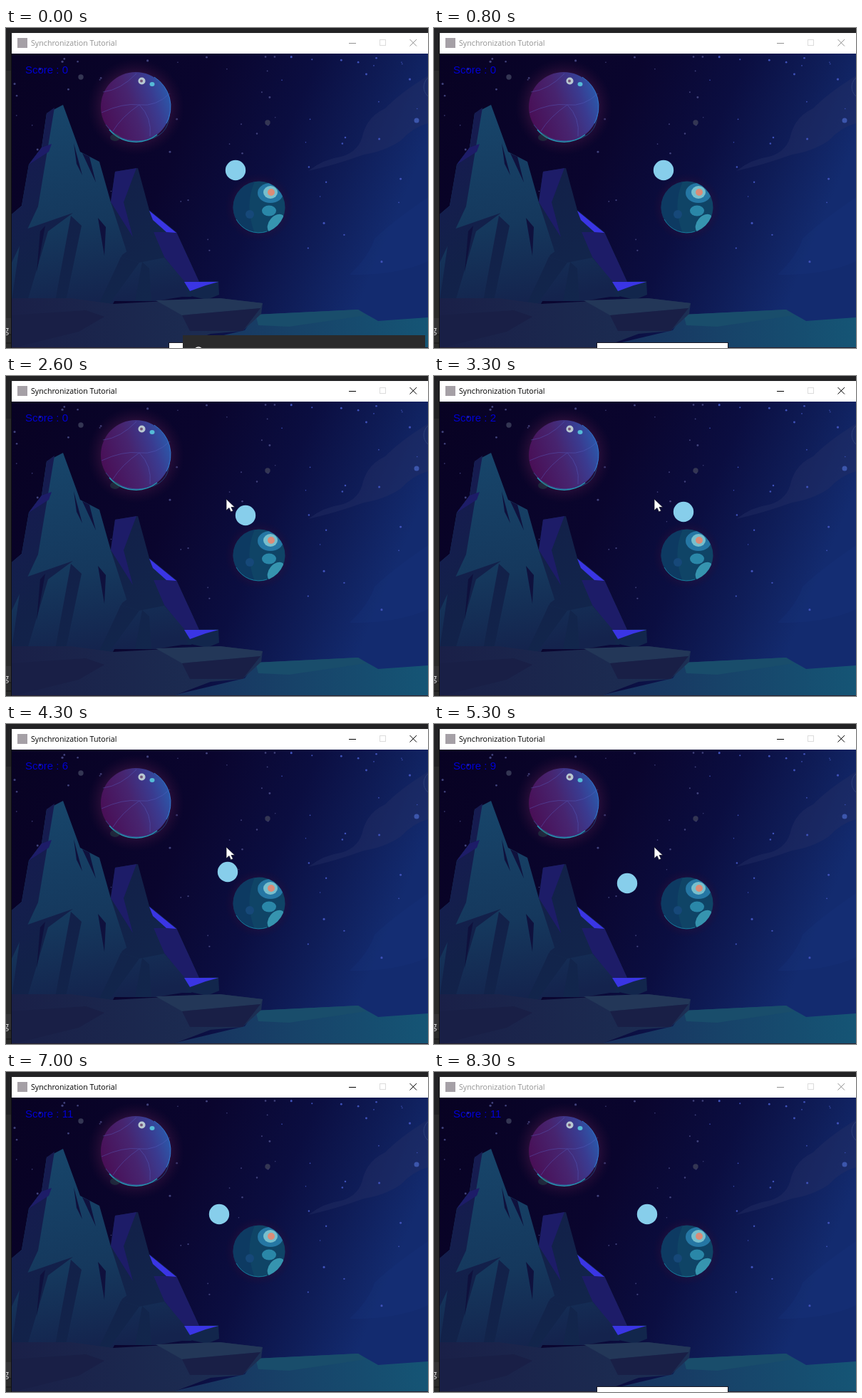
An HTML page for the animation above (8400 ms loop, 592x450 px).

```html
<!DOCTYPE html>
<html lang="en">
<head>
<meta charset="utf-8">
<title>Synchronization Tutorial</title>
<style>
  html, body { margin: 0; width: 592px; height: 450px; overflow: hidden; background: #222; }
  svg { display: block; }
  .title { font: 10.7px "Open Sans", "Noto Sans", sans-serif; }
  .score { font: 15px "Liberation Sans", Arial, sans-serif; fill: #0000d2; }
  .lit { fill: url(#lit); }
  .mid { fill: url(#mid); }
  .dark { fill: #0f113d; }
  .violet { fill: #1d1c68; }
  .bright { fill: #3a35e4; }
</style>
</head>
<body>
<svg width="592" height="450" viewBox="0 0 592 450">
  <defs>
    <linearGradient id="sky" x1="0" x2="1" y1="0" y2=".3">
      <stop offset="0" stop-color="#080223"/>
      <stop offset=".45" stop-color="#0a052e"/>
      <stop offset=".68" stop-color="#0b0e41"/>
      <stop offset=".85" stop-color="#0f1d58"/>
      <stop offset="1" stop-color="#132b6f"/>
    </linearGradient>
    <linearGradient id="lit" gradientUnits="userSpaceOnUse" x1="70" y1="110" x2="120" y2="390">
      <stop offset="0" stop-color="#17456a"/>
      <stop offset=".6" stop-color="#15385d"/>
      <stop offset="1" stop-color="#14234d"/>
    </linearGradient>
    <linearGradient id="mid" gradientUnits="userSpaceOnUse" x1="20" y1="160" x2="200" y2="380">
      <stop offset="0" stop-color="#161b50"/>
      <stop offset=".5" stop-color="#122149"/>
      <stop offset="1" stop-color="#12264c"/>
    </linearGradient>
    <linearGradient id="slab" x1="0" x2="1">
      <stop offset="0" stop-color="#1a2048"/>
      <stop offset="1" stop-color="#1c2f54"/>
    </linearGradient>
    <linearGradient id="shore" x1="0" x2="1">
      <stop offset="0" stop-color="#182f5c"/>
      <stop offset=".5" stop-color="#174369"/>
      <stop offset="1" stop-color="#155575"/>
    </linearGradient>
    <linearGradient id="violet" x1="0" x2="1" y1=".65" y2=".3">
      <stop offset="0" stop-color="#490e55"/>
      <stop offset=".45" stop-color="#47246f"/>
      <stop offset=".75" stop-color="#3a3b90"/>
      <stop offset="1" stop-color="#2a5bad"/>
    </linearGradient>
    <radialGradient id="halo">
      <stop offset=".68" stop-color="#35123f" stop-opacity=".75"/>
      <stop offset="1" stop-color="#200a30" stop-opacity="0"/>
    </radialGradient>
    <clipPath id="tealClip"><circle cx="355" cy="252" r="36.5"/></clipPath>
    <clipPath id="view"><path d="M8 36H592V449H8Z"/></clipPath>
  </defs>

  <rect width="592" height="450" fill="#222224"/>
  <path d="M0 60H7V450H0Z" fill="#2b2b2b"/>
  <path d="M0 408H8V431H0Z" fill="#343436"/>
  <path d="M0 431H8M0 443H8" stroke="#151515"/>
  <text x="-3" y="429" font-size="13" font-family="Open Sans, sans-serif" fill="#ddd">g</text>
  <path d="M7.500 450V7" stroke="#101012"/>
  <path d="M8 7H592V36H8Z" fill="#fff"/>

  <g clip-path="url(#view)">
    <rect x="8" y="36" width="584" height="414" fill="url(#sky)"/>
    <path d="M424 201Q446 184 470 181Q496 174 501 148Q508 124 532 113Q552 92 592 67V134Q570 140 553 159Q530 174 502 178Q464 192 424 201Z" fill="#263165" opacity=".4"/>
    <path d="M482 347Q510 320 517 296Q545 270 592 238V328Q550 348 482 347Z" fill="#1d3b82" opacity=".2"/>
    <circle cx="603" cy="83" r="17" fill="#1a2c68" stroke="#34477f" opacity=".7"/>
    <g id="stars"></g>

    <circle cx="182" cy="111" r="68" fill="url(#halo)"/>
    <circle cx="182" cy="111" r="49" fill="url(#violet)"/>
    <g fill="none" stroke="#5964c8" opacity=".4">
      <path d="M136 90Q161 87 183 64M134 119Q164 105 187 108T230 92M150 145Q162 125 187 108Q205 126 202 152"/>
      <path d="M140 136Q160 163 194 158T229 122" stroke="#258fd0"/>
    </g>
    <path d="M145 143A49 49 0 0 0 212 150" fill="none" stroke="#2496b0" stroke-width="1.500"/>
    <path d="M208 69A49 49 0 0 1 225 134" fill="none" stroke="#3278cf"/>
    <circle cx="190.500" cy="74.500" r="5" fill="#b9c9d2"/>
    <circle cx="190" cy="74.500" r="2" fill="#765779"/>
    <ellipse cx="205" cy="79" rx="3.500" ry="3" fill="#55bbd7"/>
    <ellipse cx="153" cy="154" rx="7" ry="5" fill="#286050" opacity=".35"/>

    <circle cx="355" cy="252" r="48" fill="url(#halo)" opacity=".6"/>
    <circle cx="355" cy="252" r="36.500" fill="#0f4466"/>
    <g clip-path="url(#tealClip)">
      <path d="M318 216H349Q334 249 349 289H318Z" fill="#0c315e" opacity=".5"/>
      <circle cx="342" cy="262" r="6" fill="#164879"/>
      <ellipse cx="371" cy="232" rx="18" ry="14" fill="#2577a4"/>
      <ellipse cx="371" cy="231" rx="10" ry="9" fill="#77bfcd"/>
      <circle cx="372" cy="231" r="5" fill="#db8c77"/>
      <ellipse cx="369" cy="257" rx="10" ry="7.500" fill="#2a87a8"/>
      <ellipse cx="379" cy="275" rx="10" ry="15" transform="rotate(40 379 275)" fill="#3694af"/>
    </g>
    <path d="M323 269A36 36 0 0 0 366 286" fill="none" stroke="#17789a"/>

    <!-- rear peak -->
    <path class="mid" d="M153 202L185 197L201 256L239 287L271 357L260 378H150L147 243Z"/>
    <path class="violet" d="M153 202L183 197L165 245L178 294L147 245ZM207 287H239L271 357H250L222 322Z"/>
    <path class="bright" d="M201 257L239 288L225 287L206 270Z"/>
    <!-- tall peak -->
    <path class="lit" d="M8 262L22 250L32 192L50 168L57 120L80 108L104 174L131 188L147 245L182 327L150 388L8 382Z"/>
    <path class="mid" d="M32 192L50 168L57 120L68 112L45 251L8 330V262L22 250ZM22 285L94 260L59 286L30 384H8ZM91 264L106 278L84 384H69ZM147 245L182 302L171 320Z"/>
    <path class="violet" d="M32 192L50 168L64 163L60 174Z"/>
    <path class="dark" d="M95 162L107 207L99 191ZM107 176L117 181L126 217ZM129 267L140 280L138 320ZM48 286L55 278L43 344Z"/>
    <!-- front rocks -->
    <path class="mid" d="M163 319L207 287L222 323L187 330L145 388H130Z"/>
    <path class="lit" d="M161 322L187 330L222 323L251 357L259 376L210 384H145Z"/>
    <path class="mid" d="M191 329L201 338L204 384H181ZM161 322L187 330L145 388H132ZM250 357L298 356L299 375L282 382L255 376Z"/>
    <path class="bright" d="M250 357H298L280 362L258 370Z"/>
    <!-- ground -->
    <path fill="url(#shore)" d="M230 450L335 425L350 403L494 396L522 412L592 407V450Z"/>
    <path fill="#194d6b" d="M350 403L494 396L506 404L397 420L354 418Z"/>
    <path fill="url(#slab)" d="M8 380H91L150 388L300 380L360 387L358 402L332 426L287 430L234 450H8Z"/>
    <path fill="#233758" d="M210 383L300 380L360 387L357 394L247 404Z"/>
    <path fill="#191f46" d="M8 404L112 397L138 406L102 427L8 450ZM247 404L357 394L332 426L258 426Z"/>

    <text id="score" class="score" x="27" y="64"></text>
    <circle id="ball" r="14.200" fill="#87ceeb"/>
  </g>

  <rect x="16" y="14" width="14" height="14" fill="#a5a0a6"/>
  <g id="chrome">
    <text class="title" x="35" y="25" fill="currentColor">Synchronization Tutorial</text>
    <path d="M481 21.500H491M566.500 16L576 25.500M576 16L566.500 25.500" fill="none" stroke="currentColor"/>
  </g>
  <rect x="524.500" y="16.500" width="8" height="8" fill="none" stroke="#dcdcdc"/>
  <path d="M8 449.500H592" stroke="#282230"/>
  <g id="preview">
    <rect x="228" y="442" width="185" height="8" fill="#171722"/>
    <rect x="229" y="443" width="183" height="7" fill="#fff"/>
  </g>
  <g id="panel">
    <rect x="248" y="432" width="340" height="18" fill="#2a2a2b"/>
    <circle cx="270" cy="455" r="6" fill="none" stroke="#fff" stroke-width="1.500"/>
  </g>
  <path id="cursor" d="M0 0V16L4 12.500L6.500 18L9.500 16.500L7 11.500H12Z" fill="#fff" stroke="#1b1b2b" stroke-width=".8"/>
</svg>
<script>
const LOOP = 8400;
const PLAY_FROM = 1900, PLAY_TO = 6300, TOP_SCORE = 11;
const $ = id => document.getElementById(id);

let seed = 17;
const random = () => (seed = seed * 16807 % 2147483647) / 2147483647;

function star(cx, cy, r, fill) {
  const el = document.createElementNS("http://www.w3.org/2000/svg", "circle");
  Object.entries({ cx, cy, r, fill }).forEach(([key, value]) => el.setAttribute(key, value));
  $("stars").append(el);
}

// Stars grow bluer to the right and rarer towards the ground.
for (let i = 0; i < 75; i++) {
  const x = 12 + random() * 575;
  const y = 40 + random() ** 1.4 * 290;
  star(x, y, .7 + random(), x > 380 ? "#3f51b8" : "#41427c");
}
star(105, 69, 3.7, "#343653");
star(367, 133, 3.7, "#343653");
star(576, 130, 3.5, "#3c56ac");

// Key points: time, x, y.
const ballPath = [[PLAY_FROM, 322, 200], [3300, 350, 191], [5300, 271, 224], [PLAY_TO, 299, 200]];
const cursorPath = [[1000, 300, 450], [1500, 250, 19], [1800, 250, 19], [2500, 309, 173], [6500, 309, 173], [6900, 318, 455]];

const clamp = v => Math.min(1, Math.max(0, v));
const smooth = u => u * u * (3 - 2 * u);

function at(path, t) {
  const next = path.findIndex(row => row[0] > t);
  const b = path.at(next);
  const a = next > 0 ? path[next - 1] : b;
  const k = a === b ? 0 : (t - a[0]) / (b[0] - a[0]);
  return [1, 2].map(i => a[i] + (b[i] - a[i]) * k);
}

const show = (id, on) => $(id).setAttribute("visibility", on ? "visible" : "hidden");
const move = (id, [x, y]) => $(id).setAttribute("transform", `translate(${Math.round(x)} ${Math.round(y)})`);

function draw(now) {
  const t = Math.floor(now % LOOP / 100) * 100;
  const active = t >= 1200 && t < 7900;
  const played = clamp((t - PLAY_FROM) / (PLAY_TO - PLAY_FROM));
  $("chrome").style.color = active ? "#000" : "#929292";
  $("score").textContent = "Score : " + Math.floor(TOP_SCORE * smooth(played));
  move("ball", at(ballPath, t));
  move("cursor", at(cursorPath, t));
  show("cursor", t >= 1000 && t < 6900);
  show("preview", !active);
  show("panel", t < 300);
}

const start = performance.now();
function tick() {
  draw(performance.now() - start);
  requestAnimationFrame(tick);
}
tick();
</script>
</body>
</html>
```
